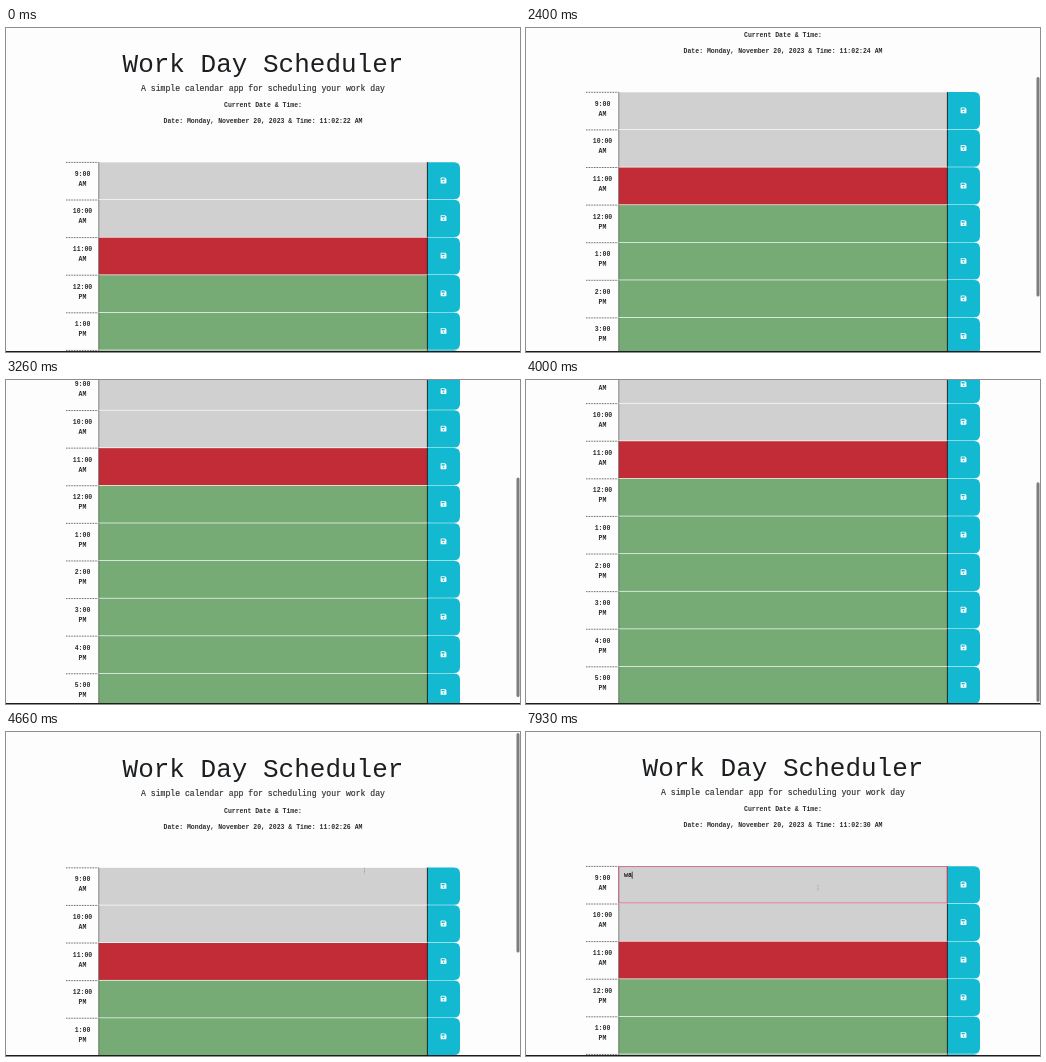
Recreate the animation shown at these times as an HTML page. Size 514 by 324 pixels, loop 8 s.

```html
<!DOCTYPE html>
<html lang="en">
<head>
<meta charset="utf-8">
<title>Work Day Scheduler</title>
<style>
  html, body { margin: 0; width: 100%; height: 100%; overflow: hidden; background: #fdfdfd; }
  svg { display: block; width: 514px; height: 324px; }
  text { font: bold 6.5px "Courier New", "Liberation Mono", monospace; fill: #2a2d30; text-anchor: middle; white-space: pre; }
  .title { font-size: 26px; font-weight: normal; fill: #1c1f22; }
  .lead { font-size: 8.13px; font-weight: normal; stroke: #2a2d30; stroke-width: .15; }
  .entry { text-anchor: start; fill: #111; }
  .past { fill: #d0d0d0; }
  .present { fill: #c12c37; }
  .future { fill: #77ab76; }
</style>
</head>
<body>
<svg viewBox="0 0 514 324">
  <rect width="514" height="324" fill="#fdfdfd"/>
  <g id="page">
    <text class="title" x="257" y="44">Work Day Scheduler</text>
    <text class="lead" x="257" y="62.5">A simple calendar app for scheduling your work day</text>
    <text x="257" y="79.2">Current Date &amp; Time:</text>
    <text id="clock" x="257" y="95.4"></text>
    <g id="rows"></g>
    <rect id="focus" x="92.6" y="134.6" width="328.6" height="36.4" fill="none" stroke="#cf6689" stroke-width=".9"/>
    <text id="entry" class="entry" x="98" y="145.1"></text>
    <rect id="caret" y="139.6" width=".7" height="7.2" fill="#111"/>
  </g>
  <path id="pointer" d="M0-3.2V3.2" stroke="#909090" stroke-width=".7" stroke-dasharray="1 .6"/>
  <rect id="scrollbar" x="510.5" width="3" height="219.6" rx="1.5" fill="#7d7d7d"/>
  <rect y="323" width="514" height="1" fill="#1d1d1d"/>
</svg>
<script>
const LOOP = 8000, ROW_TOP = 134, ROW_PITCH = 37.6;
const el = id => document.getElementById(id);

function rowMarkup(i) {
  const hour = 9 + i;
  const state = hour < 11 ? "past" : hour === 11 ? "present" : "future";
  return `<g transform="translate(0 ${ROW_TOP + i * ROW_PITCH})">
    <path d="M60 .4H92.5" stroke="#222" stroke-width=".8" stroke-dasharray=".8 .8"/>
    <text x="76.5" y="13.9">${(hour + 11) % 12 + 1}:00</text>
    <text x="76.5" y="23.9">${hour < 12 ? "AM" : "PM"}</text>
    <rect class="${state}" x="92.6" y=".4" width="328.8" height="36.9"/>
    <path d="M92.8 .4V37.3" stroke="#444" stroke-width=".6"/>
    <path d="M421.5 .2H448q6 0 6 6V31.3q0 6-6 6H421.5z" fill="#13b9d1"/>
    <path d="M421.4 .2V37.3" stroke="#111" stroke-width=".9"/>
    <g transform="translate(437.5 18.5)">
      <path d="M-2.9-2.3q0-.6.6-.6H1.6L2.9-1.6V2.3q0 .6-.6.6H-2.3q-.6 0-.6-.6z" fill="#fff"/>
      <path d="M-2-2.1H1.2V-.6H-2z" fill="#13b9d1"/>
      <circle cy="1.1" r=".8" fill="#13b9d1"/>
    </g>
  </g>`;
}
el("rows").innerHTML = Array.from({ length: 9 }, (_, i) => rowMarkup(i)).join("");

const clamp = (v, lo = 0, hi = 1) => Math.min(hi, Math.max(lo, v));
const progress = (t, start, end) => clamp((t - start) / (end - start));
// Trackpad flick: brief acceleration, long glide
const glide = p => 1 - (1 - p ** 1.5) ** 3;
const smooth = p => p * p * (3 - 2 * p);

// Adds up moves given as [start, end, ...deltas]
const moved = (t, moves, ease, axis = 0) =>
  moves.reduce((sum, m) => sum + m[2 + axis] * ease(progress(t, m[0], m[1])), 0);

const SCROLLS = [[1710, 2460, 70.2], [2580, 3590, 78.2], [4000, 4600, -150.4], [4600, 4870, 2]];
const POINTER_MOVES = [[5130, 5860, -40, 14], [6130, 6460, -17, 6], [6600, 7000, -9.5, -3]];

function draw(t) {
  const scroll = moved(t, SCROLLS, glide);
  el("page").setAttribute("transform", `translate(0 ${-scroll})`);

  const bar = el("scrollbar");
  bar.setAttribute("y", Math.max(1, 1.3 + 0.68 * scroll));
  bar.style.opacity = t < 1710 ? 0 : 1 - progress(t, 5130, 5460);

  const seconds = 22 + Math.floor((t + 200) / 1000);
  el("clock").textContent = `Date: Monday, November 20, 2023 & Time: 11:02:${seconds} AM`;

  const x = 358.5 + moved(t, POINTER_MOVES, smooth);
  const y = 139 + moved(t, POINTER_MOVES, smooth, 1);
  el("pointer").setAttribute("transform", `translate(${x} ${y})`);
  el("pointer").style.opacity = t < 4600 ? 0 : 1;

  const typed = "wa".slice(0, t < 7660 ? 0 : t < 7930 ? 1 : 2);
  el("focus").style.opacity = progress(t, 6600, 6750);
  el("entry").textContent = typed;
  el("caret").setAttribute("x", 98 + typed.length * 3.9);
  el("caret").style.opacity = t >= 7530 || (t >= 6600 && t < 7130) ? 1 : 0;
}

function tick() {
  draw(performance.now() % LOOP);
  requestAnimationFrame(tick);
}
tick();
</script>
</body>
</html>
```
